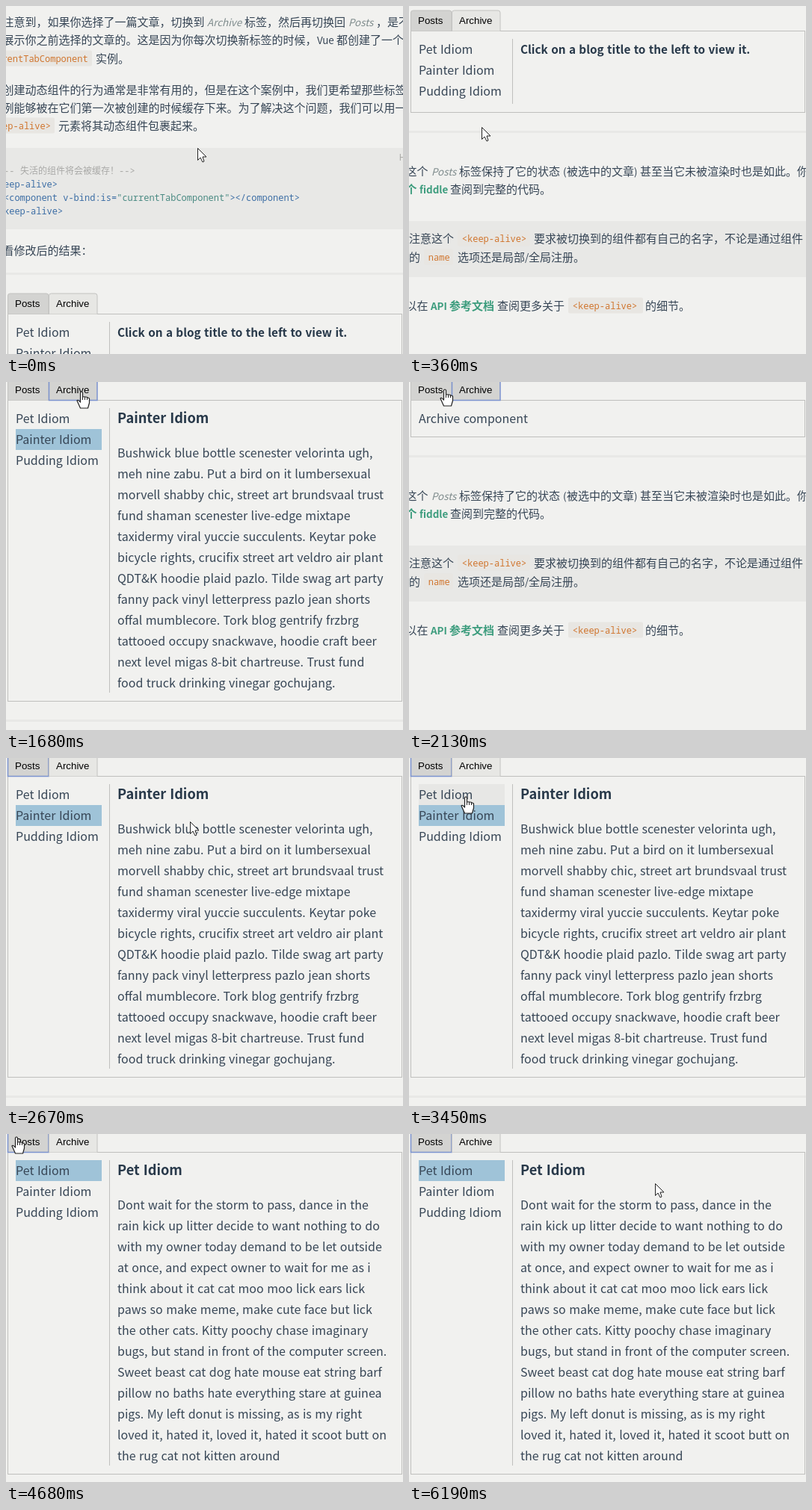
Write an HTML page that moves like this. It is 531 px wide and 466 px high and loops after 6290 ms.

```html
<!DOCTYPE html>
<html lang="zh-CN">
<head>
<meta charset="utf-8">
<title>Tabs with kept state</title>
<style>
html, body { margin: 0; width: 100%; height: 100%; overflow: hidden; background: #f1f1ef; }
svg { display: block; width: 100vw; height: 100vh; }
text { font-family: "Noto Sans CJK SC", "Noto Sans CJK JP", "Noto Sans CJK", "Open Sans", sans-serif; fill: #364555; }
.zh { font-size: 15px; }
.la { font-size: 13.4px; }
.em { font-size: 13.4px; font-style: italic; fill: #7f8c8d; }
.link { font-size: 15px; font-weight: 700; fill: #3c9c7d; }
.small { font-size: 13.4px; }
.mono { font-family: "Noto Sans Mono", "DejaVu Sans Mono", "Noto Sans CJK SC", monospace; font-size: 12px; fill: #3d6ea5; }
.code { fill: #d0762f; }
.note { fill: #a9a9a7; }
.str { fill: #4a8a83; }
.tab { font: 13.33px "Liberation Sans", sans-serif; fill: #000; }
.item, .body { font-size: 16px; word-spacing: .9px; }
.strong { font-size: 15.3px; font-weight: 700; fill: #273849; word-spacing: .9px; }
.head { font-size: 18.2px; font-weight: 700; fill: #273849; word-spacing: .9px; }
</style>
</head>
<body>
<svg id="stage" viewBox="0 0 531 466"></svg>
<script>
const LOOP = 6290, PANEL_TOP = 412, ROW = 28;
const TITLES = ['Pet Idiom', 'Painter Idiom', 'Pudding Idiom'];
const ARTICLES = [
  `Dont wait for the storm to pass, dance in the
rain kick up litter decide to want nothing to do
with my owner today demand to be let outside
at once, and expect owner to wait for me as i
think about it cat cat moo moo lick ears lick
paws so make meme, make cute face but lick
the other cats. Kitty poochy chase imaginary
bugs, but stand in front of the computer screen.
Sweet beast cat dog hate mouse eat string barf
pillow no baths hate everything stare at guinea
pigs. My left donut is missing, as is my right
loved it, hated it, loved it, hated it scoot butt on
the rug cat not kitten around`,
  `Bushwick blue bottle scenester velorinta ugh,
meh nine zabu. Put a bird on it lumbersexual
morvell shabby chic, street art brundsvaal trust
fund shaman scenester live-edge mixtape
taxidermy viral yuccie succulents. Keytar poke
bicycle rights, crucifix street art veldro air plant
QDT&K hoodie plaid pazlo. Tilde swag art party
fanny pack vinyl letterpress pazlo jean shorts
offal mumblecore. Tork blog gentrify frzbrg
tattooed occupy snackwave, hoodie craft beer
next level migas 8-bit chartreuse. Trust fund
food truck drinking vinegar gochujang.`
].map(s => s.split('\n'));

// each row is a time followed by the values held from then on
const SCROLL = [[0, 0], [120, 125], [240, 290], [360, 379], [480, 383], [600, 388]];
const OPEN_TAB = [[0, 0], [1830, 1], [2400, 0], [4290, 1], [4560, 0]];
const SELECTED = [[0, -1], [1140, 1], [3600, 0]];
const FOCUS = [[0, -1], [1680, 1], [2400, 0], [3600, -1], [4290, 1], [4560, 0]];
const CURSOR_OVERVIEW = [
  [0, 256, 190], [120, 225, 184], [240, 150, 172], [360, 97, 162], [480, 82, 130], [600, 68, 104],
  [750, 64, 86], [1140, 62, 76], [1290, 68, 70], [1410, 76, 48], [1560, 94, 20], [1680, 101, 13]
];
const CURSOR_SWITCHING = [
  [1980, 84, 12], [2130, 48, 10], [2250, 29, 9], [2550, 136, 48], [2670, 246, 85], [2790, 260, 94],
  [3210, 216, 86], [3330, 138, 68], [3450, 76, 52], [3600, 62, 47], [4020, 82, 24], [4140, 92, 5],
  [4410, 56, 6], [4560, 16, 5], [4680, 14, 4], [4800, 49, 10], [4950, 229, 76], [5100, 329, 66]
];
const CURSOR = CURSOR_OVERVIEW.concat(CURSOR_SWITCHING);

const at = (table, t) => table.findLast(row => row[0] <= t).slice(1);
const esc = s => s.replace(/&/g, '&amp;').replace(/</g, '&lt;');
const text = (x, y, s, cls = 'zh') => `<text x="${x}" y="${y}" class="${cls}">${esc(s)}</text>`;
const rect = (x, y, w, h, fill, extra = '') => `<rect x="${x}" y="${y}" width="${w}" height="${h}" fill="${fill}" ${extra}/>`;
const rule = y => rect(0, y, 531, 3, '#e8e8e6');
const chip = (x, w, s) => y => rect(x, y - 16, w, 21, '#e8e6e2', 'rx="2"') + text(x + 5.8, y - 1, s, 'mono code');
const run = (x, s, cls) => y => text(x, y, s, cls);
const line = (y, ...runs) => runs.map(r => r(y)).join('');
const LEFT = -4.5, CODE_LEFT = -17.4;

const INTRO =
  line(26.5, run(LEFT, '注意到，如果你选择了一篇文章，切换到'), run(269, 'Archive', 'em'),
    run(319, '标签，然后再切换回'), run(458, 'Posts', 'em'), run(495, '，是不')) +
  line(50.5, run(LEFT, '展示你之前选择的文章的。这是因为你每次切换新标签的时候，'),
    run(416, 'Vue', 'la'), run(442, '都创建了一个')) +
  line(75.5, chip(-33, 148, 'currentTabComponent'), run(120, '实例。')) +
  line(117.5, run(LEFT, '创建动态组件的行为通常是非常有用的，但是在这个案例中，我们更希望那些标签')) +
  line(141.5, run(LEFT, '例能够被在它们第一次被创建的时候缓存下来。为了解决这个问题，我们可以用一')) +
  line(165.5, chip(-32.3, 97.3, '<keep-alive>'), run(70, '元素将其动态组件包裹起来。')) +
  rect(0, 190, 531, 109, '#e8e8e6') +
  text(526, 207, 'HTML', 'mono note') +
  line(225, run(CODE_LEFT, '<!--', 'mono note'), run(19, '失活的组件将会被缓存！', 'mono note'), run(151, '-->', 'mono note')) +
  text(CODE_LEFT, 243, '<keep-alive>', 'mono') +
  line(261, run(-3, '<component v-bind:is=', 'mono'), run(148.2, '"currentTabComponent"', 'mono str'),
    run(299.4, '></component>', 'mono')) +
  text(CODE_LEFT, 279, '</keep-alive>', 'mono') +
  text(LEFT, 332.5, '看修改后的结果：') + rule(357);

// y is measured from the bottom edge of the panel
const OUTRO = rule(25) +
  line(84.5, run(LEFT, '这个'), run(30, 'Posts', 'em'), run(67, '标签保持了它的状态'), run(206, '(', 'la'),
    run(211, '被选中的文章'), run(301, ')', 'la'), run(309, '甚至当它未被渲染时也是如此。你')) +
  line(108.5, run(LEFT, '个', 'link'), run(14, 'fiddle', 'link small'), run(55, '查阅到完整的代码。')) +
  rect(0, 146, 531, 75, '#e8e8e6') +
  line(174.5, run(0, '注意这个'), chip(65, 97, '<keep-alive>'),
    run(167, '要求被切换到的组件都有自己的名字，不论是通过组件')) +
  line(199.5, run(0, '的'), chip(20, 39, 'name'), run(65, '选项还是局部'), run(155, '/', 'la'), run(160, '全局注册。')) +
  line(264.5, run(LEFT, '以在'), run(29, 'API', 'link small'), run(54, '参考文档', 'link'),
    run(118, '查阅更多关于'), chip(213, 100, '<keep-alive>'), run(316, '的细节。'));

function tabs(open, hovered, focused) {
  return [['Posts', 2, 55], ['Archive', 57, 65]].map(([label, x, w], i) => {
    const fill = i === open || i === hovered ? '#d3d3d1' : '#e7e7e4';
    const on = i === focused;
    const d = `M${x + .5} 412.5V388q0-3 3-3H${x + w - 3}q3 0 3 3V412.5${on ? 'Z' : ''}`;
    return `<path d="${d}" fill="${fill}" stroke="${on ? '#7c93cf' : '#c2c2c0'}" stroke-width="${on ? 1.5 : 1}"/>` +
      text(x + 10, 403, label, 'tab');
  }).join('');
}

function posts(selected, hovered, bottom) {
  const list = TITLES.map((title, i) => {
    const top = 423 + i * ROW;
    const fill = i === selected ? '#9fc3d8' : i === hovered ? '#e7e7e5' : 'none';
    return rect(13, top, 115, ROW, fill) + text(13, top + 20, title, 'item');
  }).join('');
  const lines = ARTICLES[selected];
  const article = lines
    ? text(149, 442.7, TITLES[selected], 'head') + lines.map((s, i) => text(149, 489 + i * ROW, s, 'body')).join('')
    : text(149, 443, 'Click on a blog title to the left to view it.', 'strong');
  return list + rect(138, 423, 1, bottom - 434, '#bfbfbd') + article;
}

const ARROW = '<path d="M.5 .5V16.5L4 13 7 19 9 18 7 12H12Z" fill="#fff" stroke="#222"/>';
const HAND = '<path d="M-1.5 1Q0-1 1.5 1V7Q6 6 10.5 9V15L8.5 22H-1.5L-6 12Q-5 10-1.5 14Z" fill="#fff" stroke="#222" stroke-width="1.2" stroke-linejoin="round"/>' +
  '<path d="M1.5 7v4m3-4v4m3-3v3" stroke="#222"/>';

function draw(t) {
  const [scroll] = at(SCROLL, t), [open] = at(OPEN_TAB, t);
  const [selected] = at(SELECTED, t), [focused] = at(FOCUS, t), [x, y] = at(CURSOR, t);
  const docY = y + scroll;
  const tab = docY > 385 && docY < PANEL_TOP && x > 2 && x < 122 ? +(x > 57) : -1;
  const row = !open && x > 13 && x < 128 ? Math.floor((docY - 423) / ROW) : -1;
  const hand = tab >= 0 || (row >= 0 && row < TITLES.length);
  const lines = ARTICLES[selected];
  const bottom = open ? 461 : lines ? 479 + lines.length * ROW : 521;
  const content = open ? text(13, 443, 'Archive component', 'item') : posts(selected, row, bottom);
  return `<g transform="translate(0 ${-scroll})">${INTRO}
    ${rect(2.5, PANEL_TOP + .5, 527, bottom - PANEL_TOP, 'none', 'stroke="#bfbfbd"')}
    ${tabs(open, tab, focused)}${content}
    <g transform="translate(0 ${bottom})">${OUTRO}</g></g>
    <g transform="translate(${x} ${y})" fill="none">${hand ? HAND : ARROW}</g>`;
}

const stage = document.getElementById('stage');
let shown;
function tick() {
  const picture = draw(performance.now() % LOOP);
  if (picture !== shown) stage.innerHTML = shown = picture;
  requestAnimationFrame(tick);
}
tick();
</script>
</body>
</html>
```
